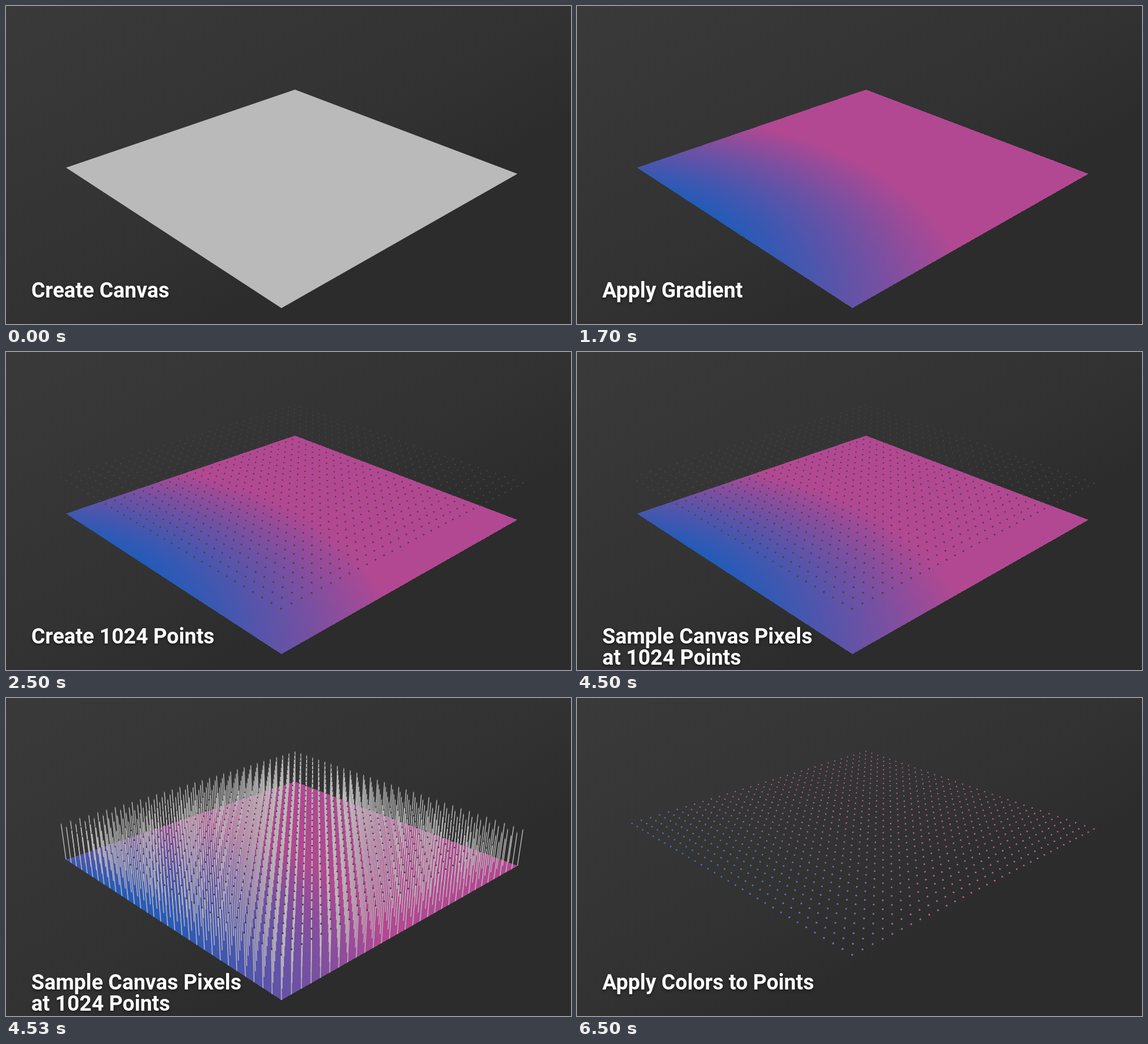
Write an HTML page with a canvas that moves like this. It is 960x540 px and loops after 8000 ms.

```html
<!DOCTYPE html>
<html lang="en">
<head>
<meta charset="utf-8">
<title>Canvas sampling</title>
<style>
  html, body { margin: 0; width: 100%; height: 100%; overflow: hidden; }
  #stage {
    position: relative; width: 960px; height: 540px; overflow: hidden;
    background: linear-gradient(to bottom right, #3a3a3a, #323232 50%, #2c2c2c 68%);
  }
  #plane { position: absolute; left: 0; top: 0; width: 500px; height: 500px; transform-origin: 0 0; background: #bababa; }
  #plane.tinted { background: radial-gradient(circle 600px at 40% -61%, #1f5cb9 300px, #b24892 575px); }
  #points { position: absolute; left: 0; top: 0; }
  #label {
    position: absolute; left: 43px; top: 465px; white-space: pre;
    font: 600 36px/36px Roboto, sans-serif; color: #fff;
    text-shadow: 0 2px 5px rgba(0, 0, 0, .5);
  }
</style>
</head>
<body>
<div id="stage">
  <div id="plane"></div>
  <canvas id="points" width="960" height="540"></canvas>
  <div id="label"></div>
</div>
<script>
const LOOP = 8000, GRID = 32, SIDE = 500;
const STEPS = [
  { at: 0, text: 'Create Canvas', plane: true },
  { at: 500, text: 'Apply Gradient', plane: true, tinted: true },
  { at: 2500, text: 'Create 1024 Points', plane: true, tinted: true, dots: true },
  { at: 4500, text: 'Sample Canvas Pixels\nat 1024 Points', plane: true, tinted: true, dots: true },
  { at: 4530, text: 'Sample Canvas Pixels\nat 1024 Points', plane: true, tinted: true, dots: true, lines: true },
  { at: 6500, text: 'Apply Colors to Points', dots: true, colored: true }
];

// Perspective map of the unit square onto left, bottom, right and top corners.
function perspective([lx, ly], [bx, by], [rx, ry], [tx, ty]) {
  const x1 = bx - rx, y1 = by - ry, x2 = tx - rx, y2 = ty - ry;
  const sx = lx - bx + rx - tx, sy = ly - by + ry - ty;
  const det = x1 * y2 - x2 * y1;
  const g = (sx * y2 - x2 * sy) / det, h = (x1 * sy - sx * y1) / det;
  const a = bx * (1 + g) - lx, b = tx * (1 + h) - lx;
  const d = by * (1 + g) - ly, e = ty * (1 + h) - ly;
  return {
    project(u, v) {
      const w = 1 + g * u + h * v;
      return { x: (lx + a * u + b * v) / w, y: (ly + d * u + e * v) / w, w };
    },
    css: `matrix3d(${[a, d, 0, g, b, e, 0, h].map(n => (n / SIDE).toFixed(9))},0,0,1,0,${lx},${ly},0,1)`
  };
}

const floor = perspective([102, 274.5], [468, 513], [869, 285], [491, 142]);
const cloud = perspective([93.5, 213], [467.5, 436], [878.5, 222.5], [491, 90.5]);
const plane = document.getElementById('plane');
const label = document.getElementById('label');
const ctx = document.getElementById('points').getContext('2d');
plane.style.transform = floor.css;

function sample(u, v) {
  const k = Math.min(1, Math.max(0, (Math.hypot(u - .4, v + .61) - .6) / .55));
  const mix = (from, to) => Math.round(from + (to - from) * k);
  return `rgb(${mix(66, 194)},${mix(116, 98)},${mix(198, 152)})`;
}

function drawPoint(u, v, step) {
  const top = cloud.project(u, v);
  if (step.lines) {
    const foot = floor.project(u, v);
    ctx.beginPath();
    ctx.moveTo(foot.x, foot.y);
    ctx.lineTo(top.x, top.y);
    ctx.stroke();
  }
  ctx.fillStyle = step.colored ? sample(u, v) : '#444';
  ctx.beginPath();
  ctx.arc(top.x, top.y, 1.25 / top.w, 0, 2 * Math.PI);
  ctx.fill();
}

function show(step) {
  label.textContent = step.text;
  plane.style.display = step.plane ? 'block' : 'none';
  plane.classList.toggle('tinted', !!step.tinted);
  ctx.clearRect(0, 0, 960, 540);
  if (!step.dots) return;
  ctx.strokeStyle = '#bcbaba';
  ctx.lineWidth = 1.4;
  const last = GRID - 1;
  for (let j = last; j >= 0; j--)
    for (let i = 0; i < GRID; i++) drawPoint(i / last, j / last, step);
}

let current;
function tick() {
  const t = performance.now() % LOOP;
  const step = STEPS.filter(s => s.at <= t).pop();
  if (step !== current) show(current = step);
  requestAnimationFrame(tick);
}
tick();
</script>
</body>
</html>
```
